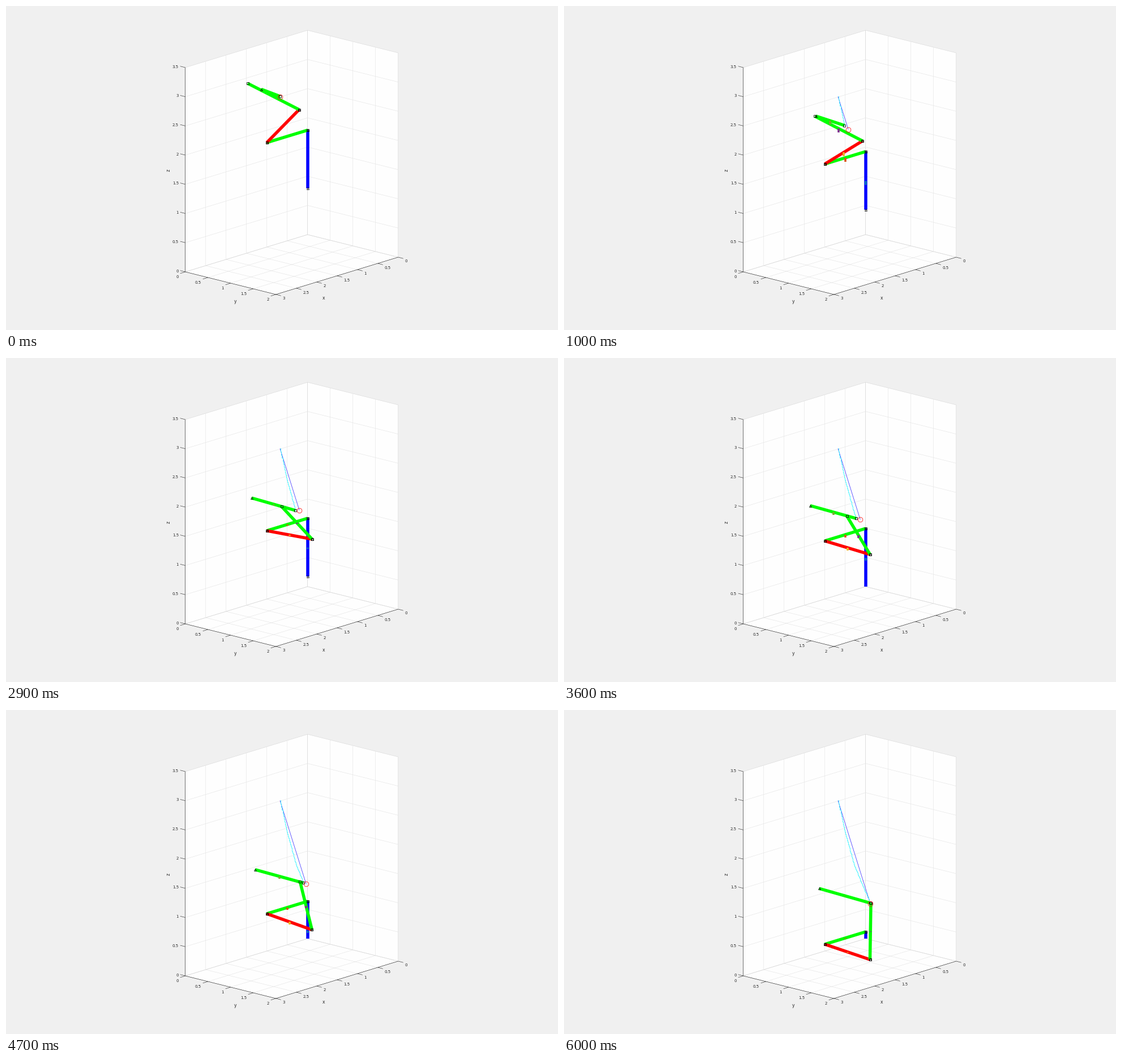
Animation, 975 px wide and 574 px high, one loop 6.1 s. Source, as a matplotlib script:

```python
import numpy as np
import matplotlib.pyplot as plt
from matplotlib.animation import FuncAnimation

W, H, DPI = 975, 574, 64
PX = 72 / DPI  # points per pixel
FRAMES, INTERVAL = 61, 100

plt.rcParams["font.family"] = "DejaVu Sans"
fig = plt.figure(figsize=(W / DPI, H / DPI), dpi=DPI, facecolor="#f0f0f0")
ax = fig.add_axes([0, 0, 1, 1])
ax.set_xlim(0, W)
ax.set_ylim(H, 0)
ax.axis("off")

ORIGIN = np.array([532.7, 405.0])
BASIS = np.array([[-72.0, 22.0], [80.0, 20.0], [0.0, -103.43]])
INK = "#262626"


def project(x, y, z):
    return ORIGIN + np.array([x, y, z]) @ BASIS


def stroke(points, color, width, z=1, **kw):
    xs, ys = np.transpose(points)
    return ax.plot(xs, ys, color=color, lw=width * PX, zorder=z,
                   solid_capstyle="butt", **kw)[0]


def label(x, y, text, size=7, ha="center", **kw):
    ax.text(x, y, text, fontsize=size * PX, color=INK, ha=ha,
            va=kw.pop("va", "baseline"), **kw)


def draw_axes():
    walls = [
        [(0, 0, 0), (3, 0, 0), (3, 0, 3.5), (0, 0, 3.5)],
        [(0, 0, 0), (0, 2, 0), (0, 2, 3.5), (0, 0, 3.5)],
        [(0, 0, 0), (3, 0, 0), (3, 2, 0), (0, 2, 0)],
    ]
    for wall in walls:
        corners = [project(*c) for c in wall]
        ax.fill(*np.transpose(corners), color="#fefefe", lw=0, zorder=0)
        stroke(corners + corners[:1], "#d9d9d9", 0.6)

    def grid(*points):
        stroke([project(*p) for p in points], "#e4e4e4", 0.6)

    for x in np.arange(0.5, 3, 0.5):
        grid((x, 0, 3.5), (x, 0, 0), (x, 2, 0))
    for y in np.arange(0.5, 2, 0.5):
        grid((0, y, 3.5), (0, y, 0), (3, y, 0))
    for z in np.arange(0.5, 3.5, 0.5):
        grid((3, 0, z), (0, 0, z), (0, 2, z))

    edges = [(3, 0, 3.5), (3, 0, 0), (3, 2, 0), (0, 2, 0)]
    stroke([project(*e) for e in edges], INK, 0.6, 2)

    def tick(pos, step, offset, value, ha):
        p = project(*pos)
        stroke([p, p + step], INK, 0.6, 2)
        label(p[0] + offset[0], p[1] + offset[1], f"{value:g}", ha=ha)

    for z in np.arange(0, 3.6, 0.5):
        tick((3, 0, z), (-9, -2.3), (-11.7, 0.6), z, "right")
    for y in np.arange(0, 2.1, 0.5):
        tick((3, y, 0), (-9, 2.8), (-11.7, 11), y, "right")
    for x in np.arange(0, 3.1, 0.5):
        tick((x, 2, 0), (9, 2.3), (11.5, 9.5), x, "left")

    label(405.5, 525.6, "y", 7.8)
    label(561.5, 520.3, "x", 7.8)
    label(287.2, 290.5, "z", 7.8, rotation=90, va="center")


# Pose keys: time, lift, two joint angles, last link's ends, goal travel, stub
KEYS = np.array([
    [0, 1.789, 44.6, 45.0, 451.0, 147.5, 484.0, 160.0, 0.00, 0],
    [10, 1.422, 33.8, 51.2, 445.0, 195.0, 495.0, 211.5, 0.318, 7],
    [18, 1.320, 20.4, 53.0, 440.0, 222.5, 503.0, 241.0, 0.437, 1],
    [29, 1.170, 2.8, 45.2, 434.0, 248.0, 511.0, 270.0, 0.598, 2],
    [42, 0.810, -4.2, 29.3, 437.5, 273.0, 521.0, 296.0, 0.760, 7],
    [53, 0.411, -4.5, 13.4, 444.5, 296.2, 531.0, 320.5, 0.879, 1],
    [60, 0.116, -4.0, 3.2, 451.0, 316.3, 541.0, 342.0, 1.00, 1],
])
TIMES, VALUES = KEYS[:, 0], KEYS[:, 1:]
SLOPES = np.gradient(VALUES, TIMES, axis=0, edge_order=2)
GOAL_START, GOAL_END = np.array([484.0, 160.5]), np.array([541.0, 343.0])


def pose(t):
    """Cubic Hermite blend of the pose keys."""
    k = min(np.searchsorted(TIMES, t, side="right") - 1, len(TIMES) - 2)
    h = TIMES[k + 1] - TIMES[k]
    u = (t - TIMES[k]) / h
    a, b = VALUES[k], VALUES[k + 1]
    return ((1 + 2 * u) * (1 - u) ** 2 * a + u * u * (3 - 2 * u) * b
            + h * u * (1 - u) * ((1 - u) * SLOPES[k] - u * SLOPES[k + 1]))


TIPS = np.array([pose(t)[5:7] for t in range(FRAMES)])


def links(p):
    lift, (a, b) = p[0], np.radians(p[1:3])
    shoulder = np.array([1, 0, lift])
    wrist = shoulder + [0, np.cos(a), np.sin(a)]
    elbow = wrist + [np.sin(b), -np.sin(a) * np.cos(b), np.cos(a) * np.cos(b)]
    base, top = project(0, 0, lift - 1), project(0, 0, lift)
    s, w, e = project(*shoulder), project(*wrist), project(*elbow)
    return [(base, top), (top, s), (s, w), (w, e), (p[3:5], p[5:7])]


draw_axes()
BLANK = [(0, 0)]
goal_path = stroke(BLANK, "#3a2cff", 0.75, 3)
tip_path = stroke(BLANK, "#30f4ff", 0.8, 3, drawstyle="steps-post")
LINK_COLORS = ["#0000ff", "#00ff00", "#ff0000", "#00ff00", "#00ff00"]
STUB_COLORS = ["#0072bd", "#d95319", "#edb120", "#7e2f8e", "#77ac30"]
bars = [stroke(BLANK, c, 5.5, 4 + i) for i, c in enumerate(LINK_COLORS)]
stubs = [stroke(BLANK, c, 3.6, 10) for c in STUB_COLORS]


def marker(shape, size, color, width):
    return ax.plot([], [], shape, ms=size * PX, mfc="none", mec=color,
                   mew=width * PX, zorder=12)[0]


starts = marker("^", 4, "black", 0.8)
ends = marker("s", 3.2, "black", 0.8)
goal = marker("o", 8.6, "#ff1010", 0.8)


def update(n):
    p = pose(n)
    arm = links(p)
    for i, (a, b) in enumerate(arm):
        start = np.minimum(a, ORIGIN) if i == 0 else a  # floor hides the base
        bars[i].set_data(*np.transpose([start, b]))
        mid = (a + b) / 2
        length = max(p[8], 0)
        hidden = i == 0 and mid[1] > ORIGIN[1]
        stubs[i].set_data([mid[0]] * 2,
                          [mid[1], mid[1] + (0 if hidden else length)])
    first = 0 if p[0] >= 1 else 1
    starts.set_data(*np.transpose([a for a, _ in arm[first:]]))
    ends.set_data(*np.transpose([b for _, b in arm]))

    target = GOAL_START + p[7] * (GOAL_END - GOAL_START)
    goal.set_data([target[0]], [target[1]])
    goal_path.set_data(*np.transpose([GOAL_START, target]))
    tip_path.set_data(*TIPS[:n + 1].T)
    return []


anim = FuncAnimation(fig, update, frames=FRAMES, interval=INTERVAL,
                     repeat=True, repeat_delay=0)
plt.show()
```
